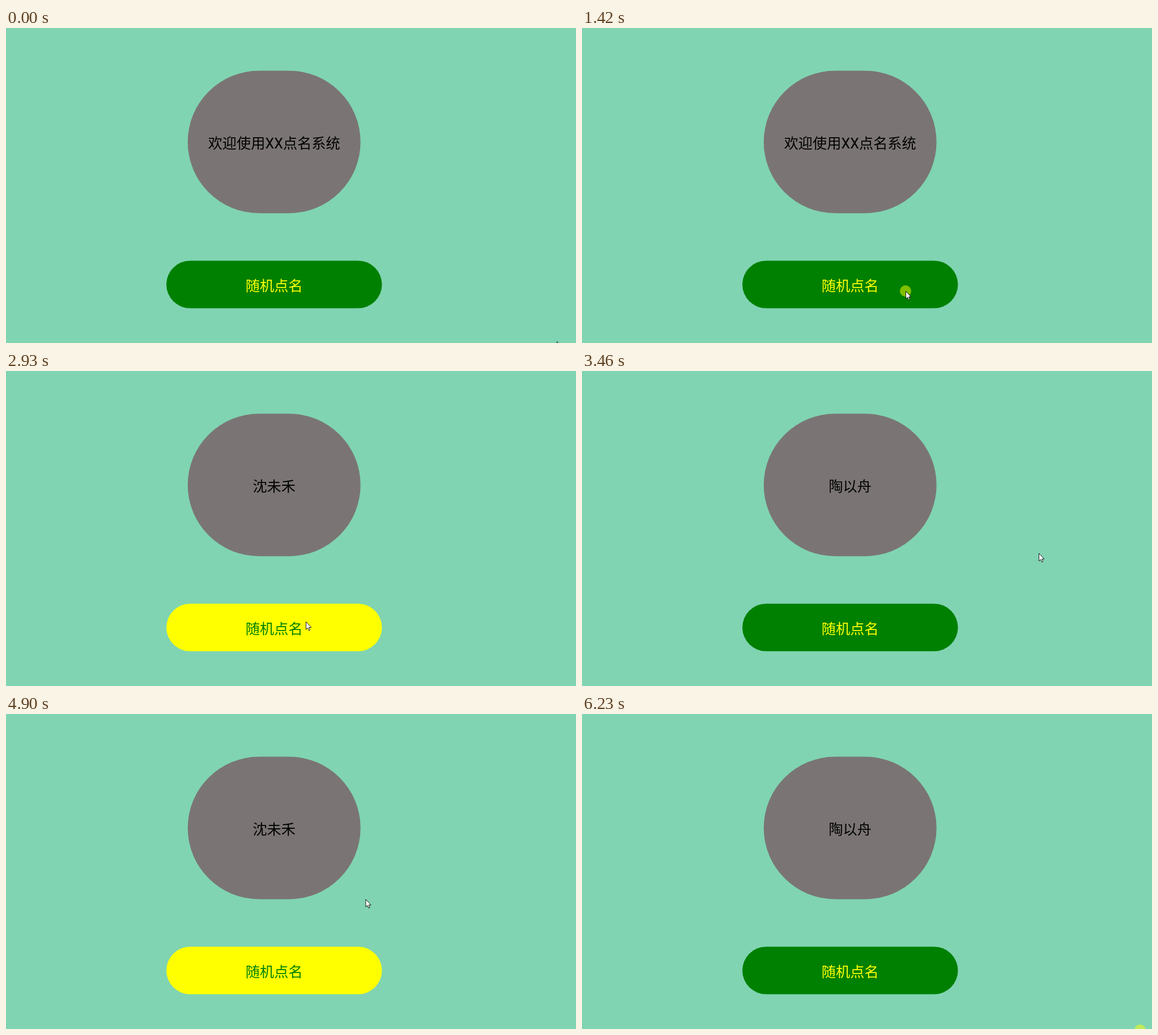
These frames come from a looping animation (1006 px wide and 557 px high, 6380 ms). An HTML page:

```html
<!DOCTYPE html>
<html lang="zh-CN">
<head>
<meta charset="utf-8">
<title>随机点名</title>
<style>
  html, body { margin: 0; height: 100%; overflow: hidden; background: #80d4b2; }
  svg { display: block; width: 100vw; height: 100vh; }
  text { font: 25.2px Roboto, "Noto Sans CJK SC", "Noto Sans CJK", sans-serif; text-anchor: middle; }
</style>
</head>
<body>
<svg viewBox="0 0 1006 557">
  <rect x="320.7" y="75.5" width="305" height="252" rx="126" fill="#7a7574"/>
  <text id="display" x="473.2" y="212.5"></text>
  <rect id="button" x="283" y="411.4" width="380.5" height="84.2" rx="42.1"/>
  <text id="label" x="473.2" y="464.5">随机点名</text>
  <g id="pointer">
    <circle id="press" r="10" fill="#ff0" fill-opacity=".5"/>
    <path d="M.5 .5V14L3.6 11.2 5.6 15.9 7.7 15 5.7 10.4H9.8Z" fill="#fff" stroke="#000" stroke-width=".9"/>
  </g>
</svg>
<script>
const LOOP = 6380, STEP = 78, ARCH = 0.12;
const [display, button, label, pointer, press] =
  ['display', 'button', 'label', 'pointer', 'press'].map(id => document.getElementById(id));

const welcome = '欢迎使用XX点名系统';
const students = ['陶以舟', '沈未禾'];
const home = { x: 972, y: 554 };

// Stops of the pointer; each move sets out from the stop before it.
const moves = [
  { start: 70, end: 540, x: 728, y: 414 },
  { start: 540, end: 690, x: 766, y: 510 },
  { start: 770, end: 1250, x: 571, y: 465 },
  { start: 1880, end: 2280, x: 739, y: 385 },
  { start: 2280, end: 2843, x: 529, y: 443 },
  { start: 3170, end: 3460, x: 806, y: 322 },
  { start: 3630, end: 3940, x: 569, y: 459 },
  { start: 4180, end: 4490, x: 695, y: 307 },
  { start: 4740, end: 5120, x: 523, y: 429 },
  { start: 5430, end: 6155, x: 985, y: 559 }
];
// Press and release times; a release picks the next student.
const clicks = [[1420, 1490], [2922, 3000], [4090, 4180], [5280, 5280], [6230, LOOP]];

// Eased progress, held between screen updates.
function progress({ start, end }, t) {
  const steps = Math.round((end - start) / STEP);
  const p = Math.min(Math.floor((t - start) / (end - start) * steps + 0.02) / steps, 1);
  return p * p * (3 - 2 * p);
}

// Hand-like motion: a straight line arched upwards in proportion to its length.
function pointerAt(t) {
  const current = moves.findLastIndex(({ start }) => start <= t);
  if (current < 0) return home;
  const from = moves[current - 1] ?? home, to = moves[current];
  const dx = to.x - from.x, dy = to.y - from.y;
  const p = progress(to, t);
  const lift = ARCH * Math.hypot(dx, dy) * Math.sin(Math.PI * p);
  return { x: from.x + dx * p, y: from.y + dy * p - lift };
}

function draw(t) {
  const picks = clicks.filter(([, release]) => release <= t).length;
  const pressed = clicks.some(([down, release]) => down <= t && t < release);
  const colors = ['#008000', '#ff0'];
  const { x, y } = pointerAt(t);
  display.textContent = picks ? students[picks % 2] : welcome;
  button.setAttribute('fill', colors[picks % 2]);
  label.setAttribute('fill', colors[1 - picks % 2]);
  pointer.setAttribute('transform', `translate(${x} ${y})`);
  press.setAttribute('visibility', pressed ? 'visible' : 'hidden');
}

function tick() {
  draw(performance.now() % LOOP);
  requestAnimationFrame(tick);
}
tick();
</script>
</body>
</html>
```
